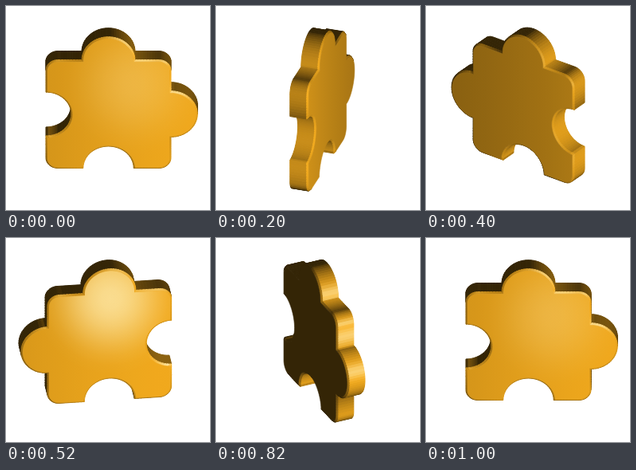
Write an HTML page with a canvas that moves like this. It is 256 px wide and 256 px high and loops after 1.02 s.

```html
<!DOCTYPE html>
<html lang="en">
<head>
<meta charset="utf-8">
<title>Turning puzzle piece</title>
<style>
html, body { margin: 0; width: 100%; height: 100%; overflow: hidden; background: #fff; }
canvas { display: block; width: 256px; height: 256px; }
</style>
</head>
<body>
<canvas id="stage" width="256" height="256"></canvas>
<script>
const ctx = document.getElementById('stage').getContext('2d');

const STEP = 20, STEPS = 51, TURN = 50;
const CX = 128.5, CY = 130.5;
const HALF = 78.5, DEPTH = 12, CORNER = 15, BEVEL = 2, REACH = 112;
const SIN = 0.5, COS = Math.sqrt(0.75);
const VIEW = [0, SIN, COS], LAMP = [150, 100, 326];
const GOLD = [248, 174, 30], SHINE = [255, 238, 180];

const unit = v => { const l = Math.hypot(...v) || 1; return v.map(c => c / l); };
const dot = (a, b) => a.reduce((sum, c, i) => sum + c * b[i], 0);
const add = (a, b) => a.map((c, i) => c + b[i]);
const lerp = (a, b, t) => a.map((c, i) => c + (b[i] - c) * t);
const css = (rgb, a = 1) => `rgba(${rgb.map(Math.round).join()},${a})`;

// Outline shrunk by e: clockwise from the top, knob (1) or notch (-1) on each side.
function outline(e) {
  const pts = [];
  [1, 1, -1, -1].forEach((sign, side) => {
    const put = (t, h) => {
      for (let i = 0; i < side; i++) [t, h] = [h, -t];
      pts.push([t, h]);
    };
    const r = (sign > 0 ? 33.3 : 31.7) - sign * e;
    const start = Math.asin(-sign * e / r);
    for (let i = 0; i <= 32; i++) {
      const a = start + (Math.PI - 2 * start) * i / 32;
      put(-r * Math.cos(a), HALF + sign * r * Math.sin(a));
    }
    for (let i = 0; i <= 10; i++) {
      const a = Math.PI / 2 * (1 - i / 10), c = HALF - CORNER;
      put(c + (CORNER - e) * Math.cos(a), c + (CORNER - e) * Math.sin(a));
    }
  });
  return pts;
}

const outer = outline(0), inner = outline(BEVEL);
const count = outer.length;

// Flat normals decide visibility, smooth ones the shading.
const flat = outer.map((a, i) => {
  const b = outer[(i + 1) % count];
  return unit([a[1] - b[1], b[0] - a[0]]);
});
const smooth = flat.map((n, i) => unit(add(n, flat[(i + count - 1) % count])));

// The rim as short pieces, so that shading runs evenly along straight parts.
const pieces = [];
outer.forEach((a, i) => {
  const j = (i + 1) % count, b = outer[j];
  const parts = Math.ceil(Math.hypot(b[0] - a[0], b[1] - a[1]) / 4);
  for (let k = 0; k < parts; k++) {
    const t = k / parts, u = (k + 1) / parts;
    pieces.push({
      a: lerp(a, b, t), b: lerp(a, b, u),
      c: lerp(inner[i], inner[j], u), d: lerp(inner[i], inner[j], t),
      flat: flat[i], smooth: unit(lerp(smooth[i], smooth[j], (t + u) / 2))
    });
  }
});

const toLamp = p => unit(LAMP.map((c, i) => c - p[i]));

function diffuse(n, p) {
  const k = 0.21 + 0.79 * Math.pow(Math.max(0, dot(n, toLamp(p))), 0.8);
  return GOLD.map(c => c * k);
}

function shade(n, p) {
  const half = unit(add(toLamp(p), VIEW));
  return lerp(diffuse(n, p), SHINE, Math.pow(Math.max(0, dot(n, half)), 30));
}

function trace(pts) {
  ctx.beginPath();
  pts.forEach(p => ctx.lineTo(p[0], p[1]));
  ctx.closePath();
}

function paint(style) {
  ctx.fillStyle = ctx.strokeStyle = style;
  ctx.fill();
  ctx.stroke();
}

function draw(step) {
  const turn = 2 * Math.PI * step / TURN;
  const s = Math.sin(turn), c = Math.cos(turn);
  const rotate = (x, y, z) => [x * c + z * s, y, z * c - x * s];
  const project = (x, y, z) => {
    const p = rotate(x, y, z);
    return [CX + p[0], CY - p[1] * COS + p[2] * SIN];
  };
  const face = c >= 0 ? 1 : -1;
  const cap = face * DEPTH, rim = face * (DEPTH - BEVEL);
  const quads = [];

  const addQuad = (piece, lean, a, b, za, d, e, zd) => {
    const tilt = n => unit(rotate(n[0], n[1], face * lean));
    if (dot(tilt(piece.flat), VIEW) <= 0) return;
    const mid = lerp(a, b, 0.5);
    quads.push({
      far: dot(rotate(...mid, 0), VIEW),
      color: css(shade(tilt(piece.smooth), rotate(...mid, (za + zd) / 2))),
      pts: [project(...a, za), project(...b, za), project(...e, zd), project(...d, zd)]
    });
  };

  for (const p of pieces) {
    addQuad(p, 0, p.a, p.b, -cap, p.a, p.b, rim);
    addQuad(p, 1.7, p.a, p.b, rim, p.d, p.c, cap);
  }
  quads.sort((p, q) => p.far - q.far);

  ctx.fillStyle = '#fff';
  ctx.fillRect(0, 0, 256, 256);
  ctx.lineWidth = 1;
  ctx.lineJoin = 'round';
  for (const q of quads) {
    trace(q.pts);
    paint(q.color);
  }

  const normal = rotate(0, 0, face);
  const tone = ctx.createLinearGradient(
    project(-REACH, 0, cap)[0], 0, project(REACH, 0, cap)[0], 0);
  for (let i = 0; i <= 8; i++) {
    const p = rotate((i / 4 - 1) * REACH, 0, cap);
    tone.addColorStop(i / 8, css(diffuse(normal, p)));
  }
  ctx.lineWidth = 0.6;
  trace(inner.map(p => project(...p, cap)));
  paint(tone);

  // Soft reflection that sweeps the face as it turns through the light.
  const yaw = Math.atan2(normal[0], normal[2]) * 180 / Math.PI;
  const glow = Math.exp(-(((yaw - 13) / 11) ** 2));
  if (glow < 0.01) return;
  const x = 160 - 4 * yaw, y = 98 - 3 * yaw;
  const g = ctx.createRadialGradient(x, y, 0, x, y, 95);
  for (let i = 0; i <= 8; i++) {
    g.addColorStop(i / 8, css(SHINE, glow * (1 + Math.cos(Math.PI * i / 8)) / 2));
  }
  ctx.fillStyle = g;
  ctx.fill();
}

const begin = performance.now();
function tick() {
  draw(Math.floor((performance.now() - begin) / STEP) % STEPS);
  requestAnimationFrame(tick);
}
tick();
</script>
</body>
</html>
```
